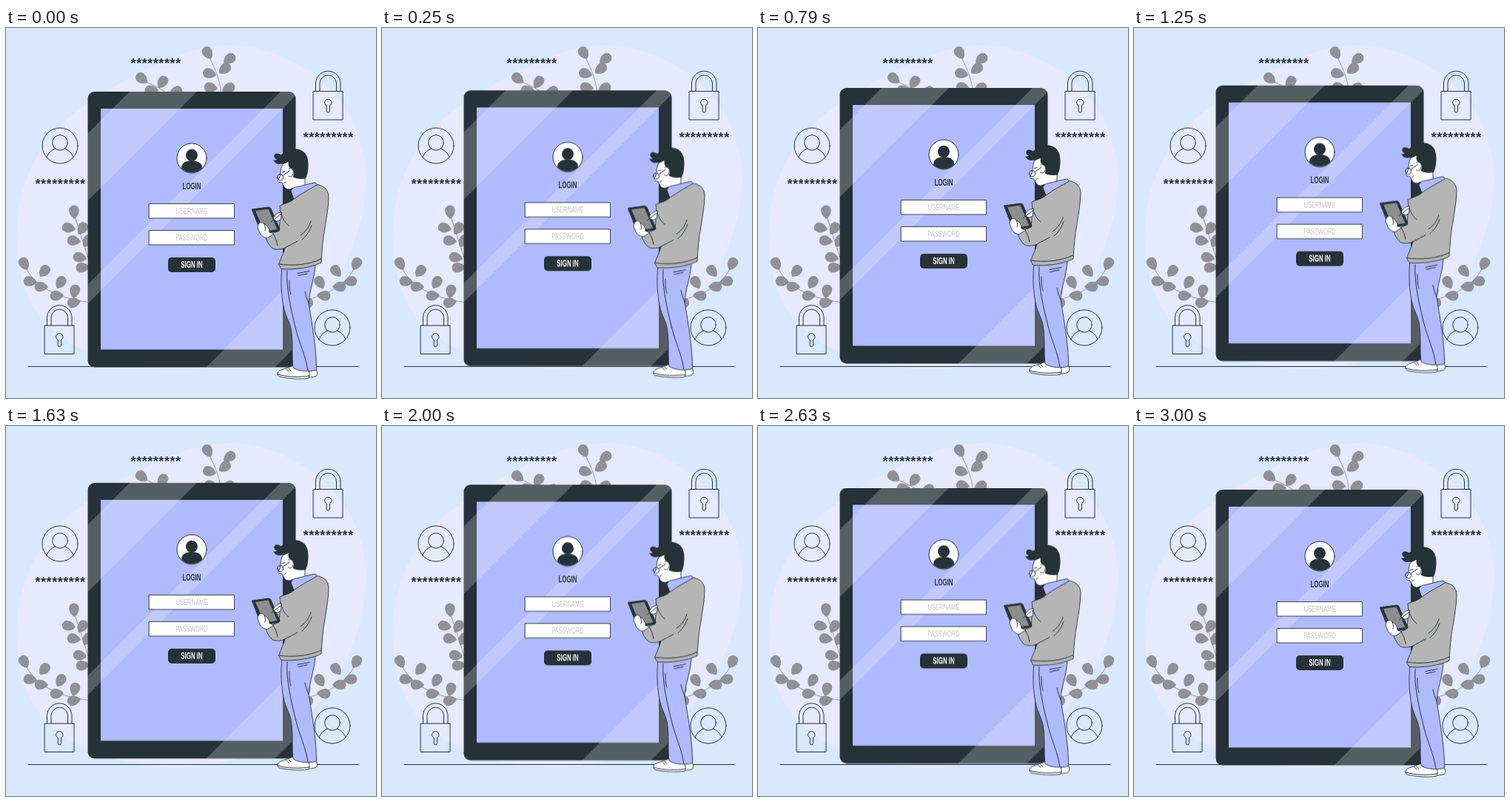
An HTML page that plays this animation: 500x500 px, repeating every 3.04 s.

```html
<!DOCTYPE html>
<html lang="en">
<head>
<meta charset="utf-8">
<title>Login illustration</title>
<style>
  html, body { margin: 0; width: 100%; height: 100%; overflow: hidden; background: #d8e8ff; }
  svg { display: block; width: 100%; height: 100%; }
  text { font-family: "Liberation Sans", Arial, sans-serif; }
  .line { fill: none; stroke: #263238; stroke-width: 1; stroke-linecap: round; stroke-linejoin: round; }
  .ink { stroke: #263238; stroke-width: .9; stroke-linejoin: round; stroke-linecap: round; }
  .dark { fill: #263238; }
  .white { fill: #fff; }
  .lilac { fill: #b0baff; }
  .wool { fill: #b5b5b5; }
  .leaves { fill: #8f9195; }
  .stem { fill: none; stroke: #8f9195; stroke-width: .9; }
  .stars { font-size: 18px; font-weight: bold; letter-spacing: .55px; fill: #263238; }
  .label { font-size: 12px; text-anchor: middle; }
  .bold { font-weight: bold; }
  .hint { font-size: 11.5px; fill: #c2c2c2; }
  .float { animation: float 3040ms steps(36) infinite; }
  @keyframes float {
    0% { transform: translateY(0); }
    49.34% { transform: translateY(-10px); }
    98.68%, 100% { transform: translateY(0); }
  }
</style>
</head>
<body>
<svg viewBox="0 0 500 500">
  <defs>
    <path id="leaf" d="M0 0C4-6 11-8.500 16-5.500Q21 0 16 5.500C11 8.500 4 6 0 0Z"/>
    <g id="lock" class="line">
      <rect x="415.500" y="85.500" width="39.500" height="38.500"/>
      <path d="M418.500 85.500V75A16.700 16.700 0 0 1 452 75V85.500M424 85.500V75A11.200 11.200 0 0 1 446.500 75V85.500"/>
      <path d="M433 105A4.700 4.700 0 1 1 437.500 105V112A2.200 2.200 0 0 1 433 112Z"/>
    </g>
    <g id="user" class="line">
      <circle cx="73" cy="159" r="24"/>
      <circle cx="73" cy="155" r="10.300"/>
      <path d="M55 175C57 169 61 165.500 66.500 163M79.500 163C85 165.500 89 169 91 175"/>
    </g>
    <clipPath id="case"><rect x="110.500" y="86" width="281" height="372.500" rx="9"/></clipPath>
    <clipPath id="face"><circle cx="251" cy="176" r="19.500"/></clipPath>
  </defs>

  <rect width="500" height="500" fill="#d8e8ff"/>
  <path fill="#e6e9ff" d="M14 275C16 205 50 140 110 102C165 67 235 24 302 23C365 24 425 60 456 104C480 140 490 185 486 220C480 290 445 360 395 405C340 452 260 470 190 458C130 450 75 430 42 385C22 355 13 315 14 275Z"/>

  <g id="plants"></g>

  <text class="stars" x="168.600" y="53.800">*********</text>
  <text class="stars" x="401.700" y="153.700">*********</text>
  <text class="stars" x="39.500" y="217.200">*********</text>

  <use href="#lock"/>
  <use href="#lock" x="-363" y="316.500"/>
  <use href="#user"/>
  <use href="#user" x="368" y="246"/>
  <path class="line" d="M30 457.500H476"/>

  <!-- Big tablet -->
  <g class="float">
    <g clip-path="url(#case)">
      <rect class="dark" x="110" y="86" width="282" height="373"/>
      <rect class="lilac" x="128" y="109" width="246" height="325.500"/>
      <g fill="#fff" opacity=".22">
        <path d="M167 86H258L110 234V143Z"/>
        <path d="M371 86H397L110 373V347Z"/>
        <path d="M392 337V430L363 459H270Z"/>
      </g>
    </g>
    <circle class="white" cx="251" cy="176" r="20"/>
    <g class="dark" clip-path="url(#face)">
      <ellipse cx="251" cy="172" rx="8" ry="8.300"/>
      <path d="M237 197V189C237 183 242 180.500 247 179.500H255C260 180.500 265 183 265 189V197Z"/>
    </g>
    <circle class="line" cx="251" cy="176" r="20"/>
    <rect class="white ink" x="193.500" y="237.500" width="115" height="19.500"/>
    <rect class="white ink" x="193.500" y="273.500" width="115" height="19.500"/>
    <rect class="dark" x="219" y="310" width="64" height="20" rx="5"/>
    <g transform="translate(251 0) scale(.66 1)">
      <text class="label bold dark" y="218.300">LOGIN</text>
      <text class="label hint" y="251.500">USERNAME</text>
      <text class="label hint" y="287.500">PASSWORD</text>
      <text class="label bold white" y="324.300">SIGN IN</text>
    </g>
  </g>

  <!-- Man -->
  <g class="float">
    <path class="white ink" d="M395 459C400 462 413 462 419 461C421 465 421 469 419 470.500C411 473 399 473 392 471Z"/>
    <path class="white ink" d="M388 456C383 459 373 461 369 463.500C366 466 366.500 469.500 369 471C381 474 399 475 409 473C411 469 410 464 408 461Z"/>
    <path class="line" d="M367 468C380 472 398 472 410 470M382 460L385 463M379 461L382 464"/>

    <path class="lilac ink" d="M373 323C371 343 372 361 375 376C378 392 385 398 386 413C388 430 386 446 388 459C395 464 411 465 419.500 462C420 438 414 402 409 372C410 354 417 339 418 320Z"/>
    <path class="line" d="M380 328C378 350 386 385 392 408C396 425 405 443 408 463M409 372C407 367 405 362 404 356M394 331.500L410 328.500M395 334.500L407 332M383 341C383 350 383 355 385 360"/>

    <path class="white ink" d="M374 184C371 190 371 195 371 199L367.500 206.500C368.500 208.500 371 208 373 209L375.500 214C378 219 384 219 387 216L389 224L404 214L404 196L390 177Z"/>
    <path class="dark" d="M371 183.500C367 185 363 182 361 178.500C363.500 179 365 178.500 366 177.500C361.500 176 361.500 172 364 170C367 168.800 370 170.500 372 171.500C373 170 375 169.500 376.500 167.500C384 161.500 397 162 403 168C409 174 409 184 408 192C407.500 198 406 201 405 203.500C398 204.500 391 204 387.500 201C390 197 389 190 384.500 189.500C381.500 188 381 184 382 180C379 182 375 184.500 371 183.500Z"/>
    <path class="white ink" d="M382 190C386 188.500 389 192 388 196.500C387 201 384 202.500 381.500 200"/>
    <path class="line" d="M366.500 202A4 4 0 1 0 374.500 201.500A4 4 0 1 0 366.500 202ZM374 199.500L383 193M373 195L377 193.500M375.500 210L378 208"/>

    <path class="lilac ink" d="M385 220C387 217 389 215 392 215C401 213 411 210 418 209L421.500 213C411 217 399 224 390 233Z"/>
    <path class="wool ink" d="M389 231C400 223 412 217 421 211.500C431 214 435.500 219 436 228C436 241 433 256 431 270C428 285 427 300 426 317C412 324 390 327 372 325.500L368.500 319.500C371 312 375 305 377 297C371 300 363 300 359 297C355 293 352 287 351 283L362 277L369 274L371 250L370 240C377 237 384 236 389 231Z"/>
    <path class="line" d="M369 319C386 322 410 320 426 312M377 297C382 294 389 291 394 288M412 261C409 270 404 276 398 280M413 267C409 277 405 282 400 286M372 251C374 259 378 264 382 267M361 278C364 283 366 288 367 294"/>

    <path class="dark ink" d="M332.500 245L355 242Q357 242 358 244L370 272Q370 274 368 274.500L348 278Q345.500 278 344.500 276Z"/>
    <path fill="#8b8d8f" d="M337 247L354.500 244.500L366.500 272L349 275Z"/>
    <path class="white ink" d="M341 265C344 261 347 262 349 265C354 267 356 272 356 276L362 278L353 284C347 283 343 279 342 274C340 271 339.500 268 341 265Z"/>
    <path class="line" d="M349 265C351 269 351 272 350 274"/>
    <path class="white ink" d="M372 249C367 249 363 253 361 257C362 260 365 261 367 261L371 259Z"/>
    <path class="line" d="M358 262L371 252"/>
  </g>
</svg>
<script>
  const plants = document.getElementById("plants");

  // Each leaf is [base x, base y, direction in degrees].
  function plant(stem, leaves, transform = "") {
    const uses = leaves.map(([x, y, a]) =>
      `<use href="#leaf" transform="translate(${x} ${y}) rotate(${a})"/>`).join("");
    plants.innerHTML +=
      `<g transform="${transform}"><path class="stem" d="${stem}"/><g class="leaves">${uses}</g></g>`;
  }

  const lowStem = "M114 371C85 367 45 358 28 326";
  const lowLeaves = [
    [29, 327, -118], [46, 336, -52], [42, 344, 190], [69, 352, -60],
    [57, 350, 183], [78, 361, 176], [91, 365, -78], [101, 369, 168]
  ];
  plant(lowStem, lowLeaves);
  plant(lowStem, lowLeaves, "translate(498) scale(-1 1)");
  plant("M115 328C110 302 100 280 93 254",
    [[93, 258, -96], [98, 279, -58], [94, 272, 192], [101, 289, 190], [105, 296, -58], [109, 312, 192], [113, 323, 176]]);
  plant("M291 98C291 72 283 56 274 38",
    [[277, 42, -118], [294, 47, -34], [284, 64, 196], [288, 61, -38], [286, 82, 190], [292, 85, -24]]);
  plant("M228 98C216 84 200 78 186 71",
    [[191, 74, 218], [206, 81, -56], [206, 84, 178], [221, 90, -25]]);
</script>
</body>
</html>
```
